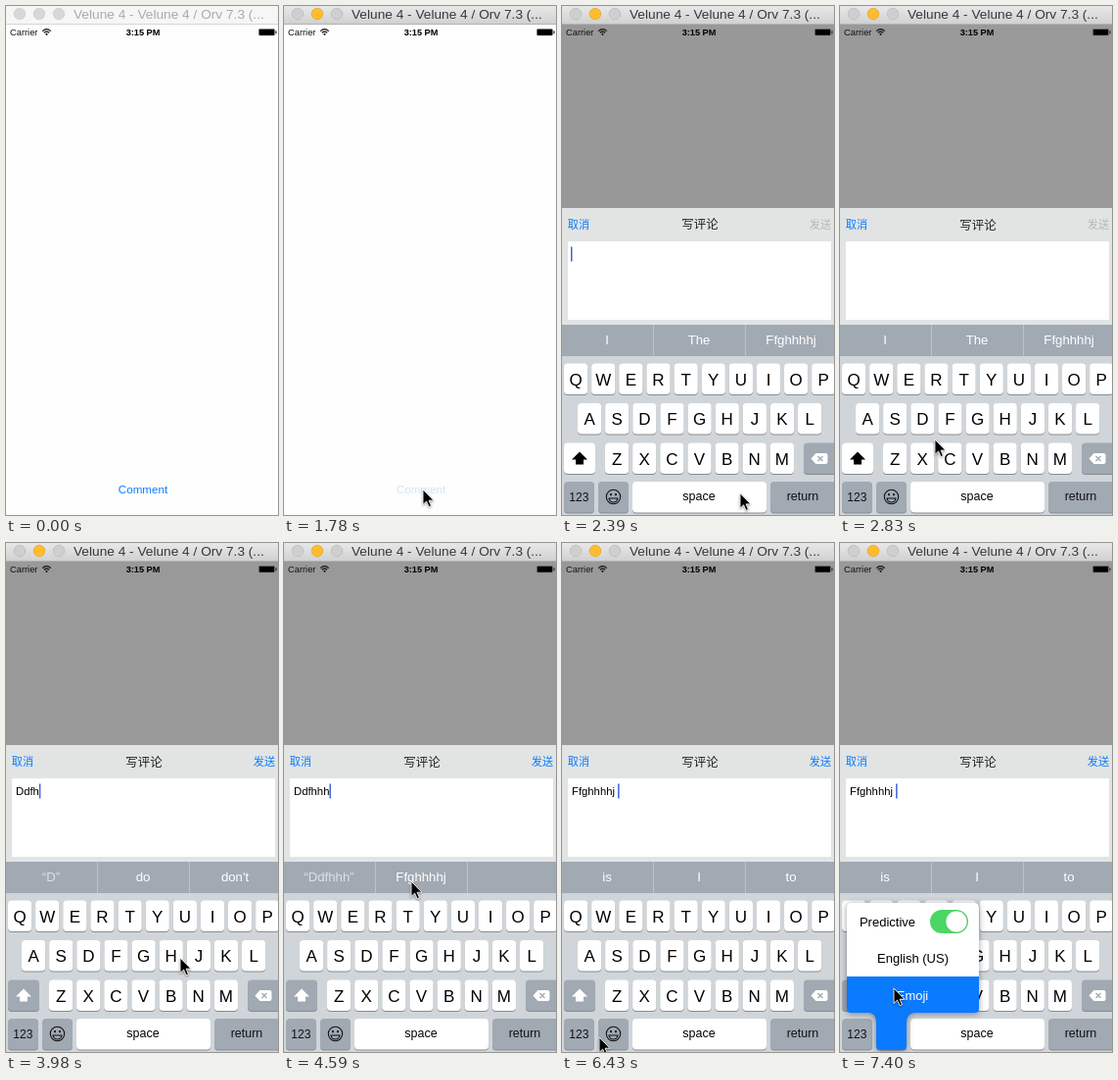
Animation, 278 px wide and 519 px high, one loop 8 s. Source, as an HTML page:

```html
<!DOCTYPE html>
<html lang="en">
<head>
<meta charset="utf-8">
<title>Comment sheet</title>
<style>
  html, body { margin: 0; width: 100%; height: 100%; overflow: hidden; background: #fefefe; }
  svg { display: block; width: 278px; height: 519px; }
  text { font-family: "Liberation Sans", Arial, sans-serif; text-anchor: middle; white-space: pre; }
  .start { text-anchor: start; }
  .cjk { font-family: "Noto Sans CJK SC", "Noto Sans CJK", sans-serif; }
  #menu { filter: drop-shadow(0 1px 3px rgba(0, 0, 0, .4)); }
  #cursor { filter: drop-shadow(0 1px 1px rgba(0, 0, 0, .4)); }
</style>
</head>
<body>
<svg id="stage" viewBox="0 0 278 519"></svg>
<script>
const LOOP = 8000, STEP = 87.8, BLUE = '#0a7bff', GREY = '#a1a9b3';
const $ = id => document.getElementById(id);
const set = (id, attrs) => { for (const k in attrs) $(id).setAttribute(k, attrs[k]); };
const label = (x, y, size, fill, str, extra = '') =>
  `<text x="${x}" y="${y}" font-size="${size}" fill="${fill}" ${extra}>${str}</text>`;
const box = (x, y, w, h, fill, extra = '') =>
  `<rect x="${x}" y="${y}" width="${w}" height="${h}" fill="${fill}" ${extra}/>`;
const key = (x, y, w, fill = '#fff', id = '') =>
  box(x, y + 1, w, 31.5, '#878b91', 'rx="4"') + box(x, y, w, 31.5, fill, `rx="4" ${id && `id="${id}"`}`);
const letters = (str, x, y) => [...str].map((c, i) => {
  const left = x + i * 28.13;
  return key(left, y, 24.2) + label(left + 12.1, y + 22, 17, '#000', c);
}).join('');

const titleBar = `
  <linearGradient id="chrome" x2="0" y2="1"><stop stop-color="#e9e8e9"/><stop offset="1" stop-color="#d2d1d2"/></linearGradient>
  ${box(0, 0, 278, 18, '#f6f6f6', 'id="bar"')}
  ${box(0, 18, 278, 1, '#d6d6d6', 'id="barEdge"')}
  ${[14, 34, 54].map((x, i) => `<circle id="light${i}" cx="${x}" cy="8" r="5.8" fill="#d8d8d8" stroke="#cbcbcb" stroke-width=".7"/>`).join('')}
  ${label(69, 13, 13.7, '#aaa', 'Velune 4 - Velune 4 / Orv 7.3 (...', 'class="start" id="title"')}`;

const statusBar = `
  ${label(4, 30, 9.3, '#111', 'Carrier', 'class="start"')}
  <g fill="none" stroke="#111" stroke-width="1.2">
    <path d="M37.2 25.6q4.3-3.8 8.6 0M38.8 27.3q2.7-2.3 5.4 0"/><circle cx="41.5" cy="28.8" r=".5"/>
  </g>
  ${label(140, 30, 9.2, '#000', '3:15 PM', 'font-weight="bold"')}
  <rect x="258.5" y="23.5" width="16" height="6.5" rx="1" fill="#000" stroke="#777" stroke-width=".6"/>
  ${box(275.3, 25.3, 1.3, 3, '#333')}`;

const sheet = `
  <g id="sheet">
    ${box(0, 19, 278, 500, '#000', 'opacity=".4"')}
    <g id="panel">
      ${box(0, 0, 281, 120, '#e1e4e3', 'id="panelBack"')}
      ${label(17, 21, 11.2, BLUE, '取消', 'class="cjk" id="cancel"')}
      ${label(141, 21.5, 12.5, '#222', '写评论', 'class="cjk" id="heading"')}
      ${label(264, 21, 11.2, '#b5b8b7', '发送', 'class="cjk" id="send"')}
      ${box(6, 34, 269, 80, '#fff', 'id="field"')}
      ${box(8, 40, 40, 15, '#c6d9ec', 'id="mark"')}
      ${label(10, 51, 11.3, '#000', '', 'class="start" id="typed"')}
      ${box(9, 39.5, 1.5, 15, '#3c62e0', 'id="caret"')}
    </g>
  </g>`;

const keyboard = `
  <g id="keyboard">
    ${box(0, 325, 278, 195, '#d0d5d9')}
    ${box(0, 325, 278, 32, GREY)}
    ${box(93, 325, 1, 32, '#bcc3ca')}${box(187, 325, 1, 32, '#bcc3ca')}
    ${[46, 140, 234].map((x, i) => label(x, 345, 13.2, '#fff', '', `id="word${i}"`)).join('')}
    ${letters('QWERTYUIOP', 2, 364.5)}
    ${letters('ASDFGHJKL', 16, 405)}
    ${letters('ZXCVBNM', 44, 445.5)}
    ${key(2, 445.5, 32, GREY, 'shift')}
    <path id="arrow" d="M18 454.5l8 8h-4v5h-8v-5h-4z"/>
    ${key(247, 445.5, 34, GREY)}
    <path d="M254.5 461.5l5-5.5h10q2 0 2 2v7q0 2-2 2h-10z" fill="#fff"/>
    <path d="M261.5 459l5 5m0-5l-5 5" stroke="${GREY}" stroke-width="1.3"/>
    ${key(2, 485, 31, GREY)}${label(17.3, 504.5, 12, '#111', '123')}
    ${key(37, 485, 31, GREY, 'emojiKey')}
    <g fill="none" stroke="#111" stroke-width="1.1">
      <circle cx="52.5" cy="500.5" r="7.2"/>
      <path d="M48 502h9q-.8 4-4.5 4t-4.5-4z"/>
      <path d="M50 497v2.2m5-2.2v2.2" stroke-width="1.7"/>
    </g>
    ${key(72, 485, 137)}${label(140, 504, 12.5, '#000', 'space')}
    ${key(213, 485, 68, GREY)}${label(246, 504, 12.5, '#111', 'return')}
  </g>`;

const menu = `
  <g id="menu">
    <path id="choice" d="M7 441H142V475q0 4-4 4H76Q68 480 68 489V513q0 4-4 4H41q-4 0-4-4V489Q37 480 30 479H11q-4 0-4-4z"/>
    <path d="M7 442V372q0-5 5-5H137q5 0 5 5V442z" fill="#fff"/>
    ${label(48.5, 391, 13, '#000', 'Predictive')}
    ${box(92, 374, 39, 24, '#4bd763', 'rx="12"')}
    <circle cx="119" cy="386" r="11" fill="#fff" stroke="#38b24d" stroke-width=".5"/>
    ${label(74.5, 428, 13, '#000', 'English (US)')}
    ${label(74, 466, 13, '#000', 'Emoji', 'id="choiceText"')}
  </g>`;

$('stage').innerHTML = `
  ${label(140, 497, 11.6, BLUE, 'Comment', 'id="button"')}
  ${sheet}${statusBar}${titleBar}${keyboard}${menu}
  <path id="cursor" d="M0 0V15.5l3.6-3.4 2.5 5.6 2.4-1.1-2.4-5.4h4.9z" stroke="#fff" stroke-width=".9"/>`;

const pointer = [
  [1160, 226, 493], [1430, 144, 493], [1610, 142, 493], [1870, 142, 493],
  [2219, 182, 498], [2600, 182, 495], [2830, 97, 442], [2920, 90, 425],
  [3450, 90, 425], [3540, 118, 424], [3700, 118, 424], [3900, 178, 423],
  [4240, 178, 423], [4500, 130, 345], [5550, 130, 345], [6000, 47, 497],
  [6200, 47, 500], [6430, 38, 504], [6610, 38, 506], [7100, 38, 506], [7390, 55, 454]];
const typing = [[0, ''], [2950, 'D'], [3200, 'Dd'], [3530, 'Ddf'], [3880, 'Ddfh'],
  [4050, 'Ddfhh'], [4200, 'Ddfhhh'], [5250, 'Ffghhhhj ']];
const words = [[0, ['I', 'The', 'Ffghhhhj']], [3180, ['“D”', 'do', "don't"]],
  [4500, ['“Ddfhhh”', 'Ffghhhhj', '']], [5450, ['is', 'I', 'to']]];
const caretAlpha = [[0, 1], [2600, 0], [2950, 1], [5250, .5], [5370, 1], [5900, 0], [6250, .5], [6340, 1]];

const latest = (list, t) => list.filter(e => e[0] <= t).pop()[1];
const within = (t, a, b) => t >= a && t < b;
const show = (id, on) => set(id, { visibility: on ? 'visible' : 'hidden' });
const ease = x => { x = Math.min(1, Math.max(0, x)); return x * x * (3 - 2 * x); };

function pointerAt(t) {
  const i = pointer.findIndex(p => p[0] > t);
  if (i < 0) return pointer[pointer.length - 1].slice(1);
  const b = pointer[i], a = pointer[Math.max(0, i - 1)];
  if (a === b) return b.slice(1);
  const k = ease((t - a[0]) / (b[0] - a[0]));
  return [a[1] + (b[1] - a[1]) * k, a[2] + (b[2] - a[2]) * k];
}

function draw(t) {
  const active = t >= 1775;
  set('bar', { fill: active ? 'url(#chrome)' : '#f6f6f6' });
  set('barEdge', { fill: active ? '#b3b2b3' : '#d6d6d6' });
  set('title', { fill: active ? '#383838' : '#aaa' });
  for (const i of [0, 2]) set('light' + i, { fill: active ? '#d0cfd0' : '#d8d8d8', stroke: active ? '#b9b8b9' : '#cbcbcb' });
  set('light1', { fill: active ? '#ffbd2e' : '#d8d8d8', stroke: active ? '#e1a325' : '#cbcbcb' });
  set('button', { fill: within(t, 1775, 1950) ? '#cfe4fb' : BLUE });

  const p = ease((t - 2045) / 350), width = 240 + 41 * p;
  set('sheet', { opacity: p });
  set('panel', { transform: `translate(0 ${260 - 54 * p})` });
  set('panelBack', { width });
  set('field', { width: width - 12 });
  set('cancel', { x: 29 - 12 * p, y: 27 - 6 * p });
  set('heading', { x: 126 + 15 * p, y: 17.5 + 4 * p });

  const str = latest(typing, t);
  set('send', { x: 228 + 36 * p, y: 27 - 6 * p, fill: str ? BLUE : '#b5b8b7' });
  $('typed').textContent = str;
  set('caret', { x: str ? 10 + $('typed').getComputedTextLength() : 9, opacity: latest(caretAlpha, t) });
  set('mark', { opacity: +within(t, 5050, 5330) });

  set('keyboard', { transform: `translate(0 ${195 * (1 - p)})` });
  latest(words, t).forEach((word, i) => {
    $('word' + i).textContent = word;
    set('word' + i, { opacity: p * (word[0] === '“' ? .65 : 1) });
  });
  set('word1', { fill: within(t, 5200, 5450) ? '#0a6cf0' : '#fff' });
  set('shift', { fill: str ? GREY : '#fff' });
  set('arrow', { fill: str ? '#fff' : '#000' });
  set('emojiKey', { fill: t >= 6780 ? '#fff' : GREY });

  const chosen = t >= 7220;
  show('menu', t >= 7050);
  set('choice', { fill: chosen ? '#0a7aff' : '#fff' });
  set('choiceText', { fill: chosen ? '#fff' : '#000' });

  show('cursor', t >= 1160);
  set('cursor', { transform: `translate(${pointerAt(t)})` });
}

// The screen refreshes in fixed steps, like a recording.
function tick() {
  const t = performance.now() % LOOP;
  draw(Math.max(0, 1780 + Math.floor((t - 1780) / STEP + .1) * STEP));
  requestAnimationFrame(tick);
}
tick();
</script>
</body>
</html>
```
